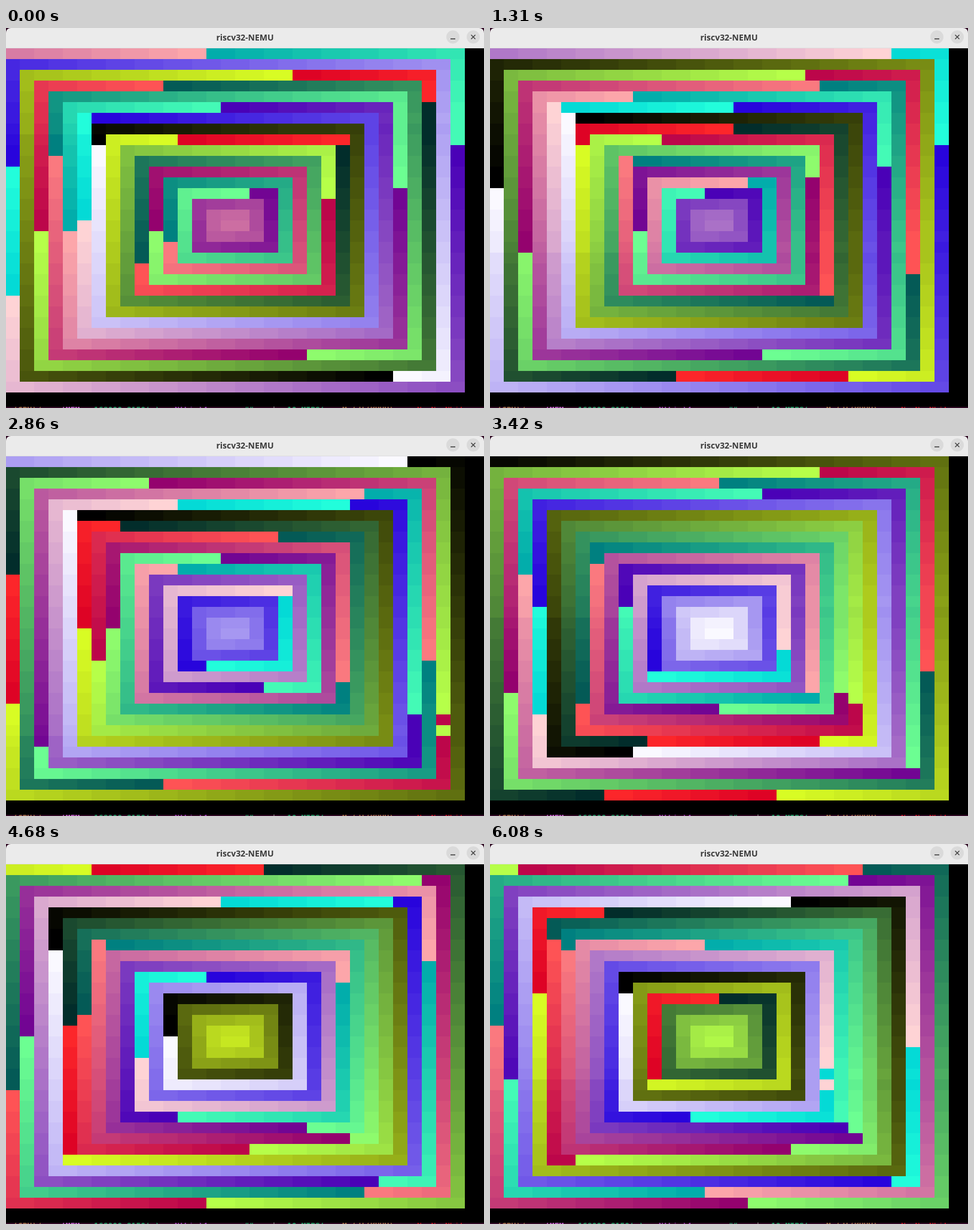
Write an HTML page with a canvas that moves like this. It is 799 by 636 pixels and loops after 6150 ms.

```html
<!DOCTYPE html>
<html lang="en">
<head>
<meta charset="utf-8">
<title>riscv32-NEMU</title>
<style>
  html, body { margin: 0; width: 100%; height: 100%; overflow: hidden; background: #300a24; }
  body { position: relative; }
  header {
    position: absolute; left: 0; top: 0; width: 799px; height: 34px; box-sizing: border-box;
    background: #ebebeb; border-bottom: 1px solid #dedede; border-radius: 8px 8px 0 0;
    font: 700 14px/32px "Open Sans", "Noto Sans", sans-serif; color: #3b3b3b; text-align: center;
  }
  header svg { position: absolute; left: 0; top: 0; }
  canvas { position: absolute; left: 0; top: 34px; }
  footer {
    position: absolute; left: 12px; top: 634px; width: 787px; height: 2px; overflow: hidden;
    font: 700 13px/14px "DejaVu Sans Mono", monospace; white-space: pre;
  }
  footer span { position: absolute; top: -2px; }
</style>
</head>
<body>
<header>riscv32-NEMU
  <svg width="799" height="33" fill="none" stroke="#3b3b3b" stroke-width="1.4">
    <g fill="#dadada" stroke="none"><circle cx="747" cy="15" r="11"/><circle cx="781" cy="15" r="11"/></g>
    <path d="M743 18.3h8M777.5 11.5l7 7m0-7l-7 7"/>
  </svg>
</header>
<canvas id="screen" width="799" height="600"></canvas>
<footer>
  <span style="left:0;color:#a2734c">(CPU)/</span>
  <span style="left:80px;color:#c061cb">(MEM:</span>
  <span style="left:135px;color:#26a269">168000 8150(a)</span>
  <span style="left:270px;color:#a347ba">Nthis)4</span>
  <span style="left:386px;color:#26a269">##</span>
  <span style="left:424px;color:#d0cfcc">uim</span>
  <span style="left:458px;color:#26a269">10 MIPS(</span>
  <span style="left:550px;color:#a2734c">Mm(dt(KHUU)</span>
  <span style="left:675px;color:#c01c28">No No Nbit</span>
</footer>
<script>
const N = 32, CELL_W = 24, CELL_H = 18, LOOP = 6150;
const ctx = document.getElementById("screen").getContext("2d");

// [ms, tick]: when the picture is refreshed
const refresh = [[0, 0], [70, 1], [750, 11], [1380, 20], [2010, 29], [2650, 38], [3280, 47],
  [3900, 56], [4540, 65], [5170, 74], [5810, 83], [6080, 87], [LOOP, 88]];
// [tick, progress]: whole part is the colour phase, fraction is how much is repainted
const phase = [[0, 163.24], [11, 184.2], [28, 216.908], [41, 241.81], [57, 271.102],
  [67, 290], [87, 328.626], [88, 330.5]];

function lerp(points, x) {
  let i = 1;
  while (i < points.length - 1 && points[i][0] < x) i++;
  const [x0, y0] = points[i - 1], [x1, y1] = points[i];
  return y0 + (y1 - y0) * (x - x0) / (x1 - x0);
}

// Clockwise inward spiral: cell index -> step number
function makeSpiral() {
  const steps = new Array(N * N).fill(-1);
  const dx = [1, 0, -1, 0], dy = [0, 1, 0, -1];
  const free = (x, y) => x >= 0 && x < N && y >= 0 && y < N && steps[y * N + x] < 0;
  let x = 0, y = 0, d = 0;
  for (let step = 0; step < N * N; step++) {
    steps[y * N + x] = step;
    if (!free(x + dx[d], y + dy[d])) d = (d + 1) % 4;
    x += dx[d];
    y += dy[d];
  }
  return steps;
}

const spiral = makeSpiral();
const flip = refresh.map(([ms, tick]) => [tick, ms]);
const starts = Array.from({ length: 88 }, (_, tick) => Math.floor(lerp(flip, tick) / 10 + 1e-6) * 10);

function draw(tick) {
  const progress = lerp(phase, tick), base = Math.floor(progress);
  const painted = (progress - base) * N * N;
  ctx.fillStyle = "#000";
  ctx.fillRect(0, 0, 799, 600);
  spiral.forEach((step, cell) => {
    const b = (base + (cell < Math.floor(painted) ? 1 : 0) + (step >> 1)) & 255;
    ctx.fillStyle = `rgb(${b * 6 & 255},${b * 7 & 255},${b})`;
    ctx.fillRect(cell % N * CELL_W - 1, Math.floor(cell / N) * CELL_H, CELL_W, CELL_H);
  });
}

const origin = performance.now();
let shown = -1;
function animate() {
  const t = (performance.now() - origin) % LOOP;
  let tick = starts.length - 1;
  while (starts[tick] > t) tick--;
  if (tick !== shown) draw(shown = tick);
  requestAnimationFrame(animate);
}
animate();
</script>
</body>
</html>
```
